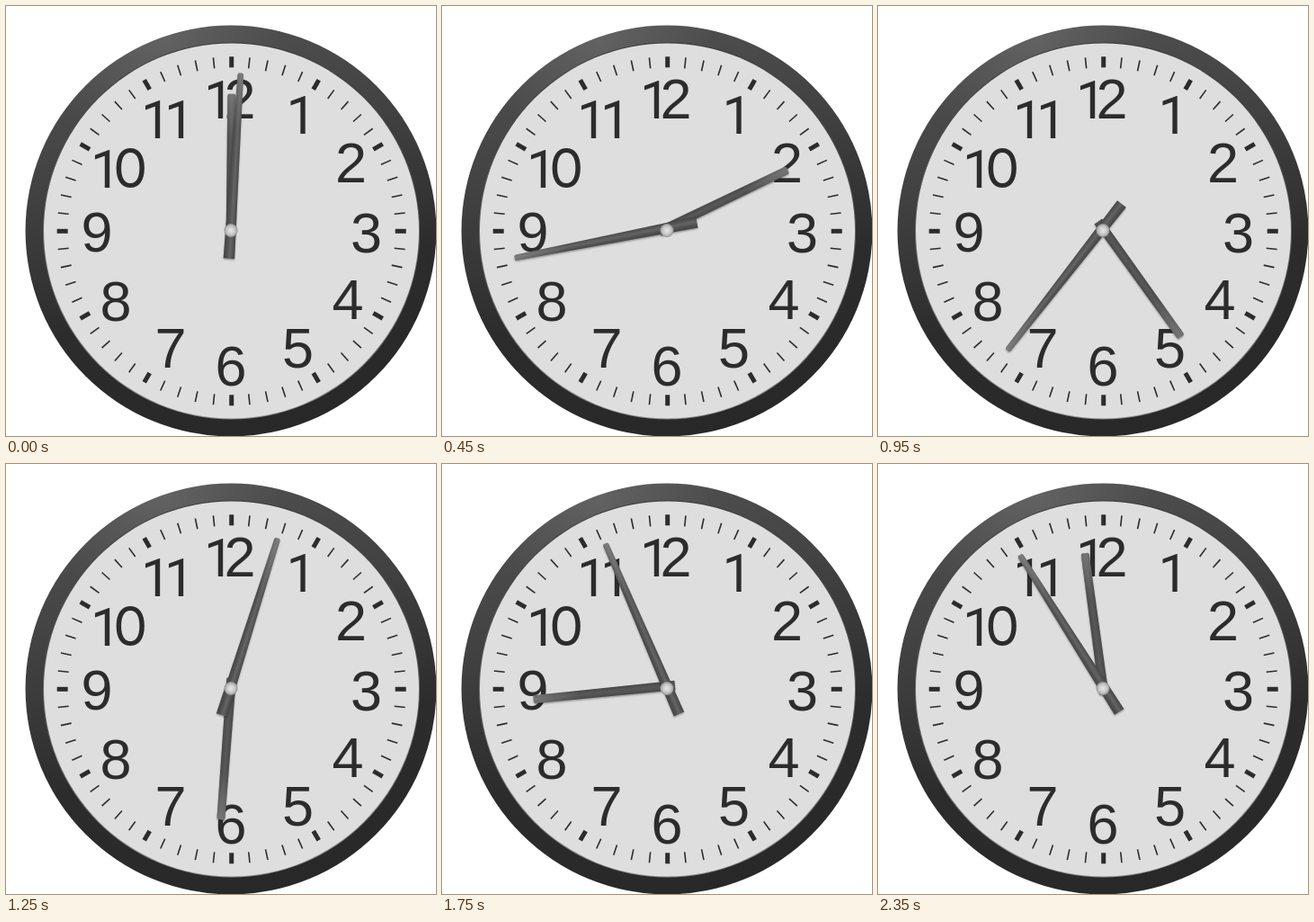
These frames come from a looping animation (478x478 px, 2.4 s). An HTML page with a canvas:

```html
<!DOCTYPE html>
<html lang="en">
<head>
<meta charset="utf-8">
<title>Wall clock</title>
<style>
  html, body { margin: 0; width: 100%; height: 100%; overflow: hidden; background: #fff; }
  canvas { display: block; width: 478px; height: 478px; }
</style>
</head>
<body>
<canvas id="clock" width="478" height="478"></canvas>
<script>
const SIZE = 478, C = 250, LOOP = 2400, STEP = 50;
const ctx = document.getElementById('clock').getContext('2d');

// glyph, ink centre x, baseline
const DIGITS = [
  ['1', 233, 124.5], ['2', 260, 124.5],
  ['1', 324.5, 141.5], ['2', 383.5, 195.5], ['3', 400.5, 273.5], ['4', 380, 347.5],
  ['5', 324.5, 401.5], ['6', 250.5, 422], ['7', 183, 401.5], ['8', 122, 350],
  ['9', 101, 272.5], ['1', 107, 201.5], ['0', 138, 201.5],
  ['1', 163, 147], ['1', 189, 147]
];
const FONTS = { 0: '61px Inter, sans-serif', 1: '59.5px Roboto, sans-serif' };
const BASE_FONT = '63px "Liberation Sans", Arial, sans-serif';

function gradient(g, x0, y0, x1, y1, stops) {
  const fill = g.createLinearGradient(x0, y0, x1, y1);
  stops.forEach(([at, color]) => fill.addColorStop(at, color));
  return fill;
}

function glow(g, x, y, r0, r1, stops) {
  const fill = g.createRadialGradient(x, y, r0, x, y, r1);
  stops.forEach(([at, color]) => fill.addColorStop(at, color));
  return fill;
}

function disc(g, x, y, r, fill) {
  g.beginPath();
  g.arc(x, y, r, 0, Math.PI * 2);
  g.fillStyle = fill;
  g.fill();
}

function drawDial(g) {
  g.fillStyle = '#fff';
  g.fillRect(0, 0, SIZE, SIZE);
  disc(g, C, C, 228.4, gradient(g, 190, 22, 300, 478,
    [[0, '#505050'], [0.3, '#424242'], [0.65, '#2c2c2c'], [1, '#282828']]));
  disc(g, C, C, 228.4, glow(g, 175, 40, 0, 130,
    [[0, 'rgba(255,255,255,.11)'], [1, 'rgba(255,255,255,0)']]));

  g.filter = 'blur(0.5px)';
  disc(g, C + 0.5, C, 209.5, gradient(g, 0, 41, 0, 460, [[0, '#3a3a3a'], [1, '#8c8c8c']]));
  disc(g, C + 0.5, C, 208.5, '#dedede');

  g.fillStyle = '#2c2c2c';
  for (let i = 0; i < 60; i++) {
    const w = i % 5 ? 1.6 : 5;
    g.save();
    g.translate(C + 0.7, C + 0.3);
    g.rotate(i * Math.PI / 30);
    g.fillRect(-w / 2, -194, w, 12);
    g.restore();
  }

  for (const [glyph, x, y] of DIGITS) {
    g.font = FONTS[glyph] || BASE_FONT;
    const m = g.measureText(glyph);
    g.fillText(glyph, x + (m.actualBoundingBoxLeft - m.actualBoundingBoxRight) / 2, y);
  }
}

function drawHand(deg, length, tail, tipWidth, tailWidth, stops) {
  const a = tipWidth / 2, b = tailWidth / 2;
  ctx.save();
  ctx.translate(C, 246.8);
  ctx.rotate(deg * Math.PI / 180);
  ctx.beginPath();
  ctx.moveTo(-b, tail);
  ctx.lineTo(-a, 2 - length);
  ctx.lineTo(1 - a, -length);
  ctx.lineTo(a - 1, -length);
  ctx.lineTo(a, 2 - length);
  ctx.lineTo(b, tail);
  ctx.closePath();
  ctx.shadowColor = 'rgba(0,0,0,.3)';
  ctx.shadowBlur = 2;
  ctx.shadowOffsetY = 1.5;
  ctx.fillStyle = gradient(ctx, -b, 0, b, 0, stops);
  ctx.fill();
  // the far end catches a little light
  ctx.shadowColor = 'transparent';
  ctx.fillStyle = gradient(ctx, 0, -length, 0, 0,
    [[0, 'rgba(165,165,165,.4)'], [0.35, 'rgba(165,165,165,0)']]);
  ctx.fill();
  ctx.restore();
}

const dial = document.createElement('canvas');
dial.width = dial.height = SIZE;
drawDial(dial.getContext('2d'));

// every twentieth pose is held for two steps
function poseAt(ms) {
  const slot = Math.floor((ms % LOOP) / STEP);
  return 20 * Math.floor(slot / 21) + Math.max(0, slot % 21 - 1);
}

function draw(pose) {
  ctx.drawImage(dial, 0, 0);
  drawHand(0.3 + pose * 8, 149, 9, 9, 10.5,
    [[0, '#484848'], [0.5, '#585858'], [1, '#484848']]);
  drawHand(3.6 + pose * 31.91, 172.5, 34, 6.5, 12.5,
    [[0, '#444'], [0.3, '#505050'], [0.55, '#646464'], [1, '#444']]);
  disc(ctx, C, 249.5, 7.5, glow(ctx, C, 249.5, 1, 7.5,
    [[0, '#e2e2e2'], [0.6, '#c4c4c4'], [1, '#909090']]));
}

const start = performance.now();
function tick() {
  draw(poseAt(performance.now() - start));
  requestAnimationFrame(tick);
}
tick();
</script>
</body>
</html>
```
